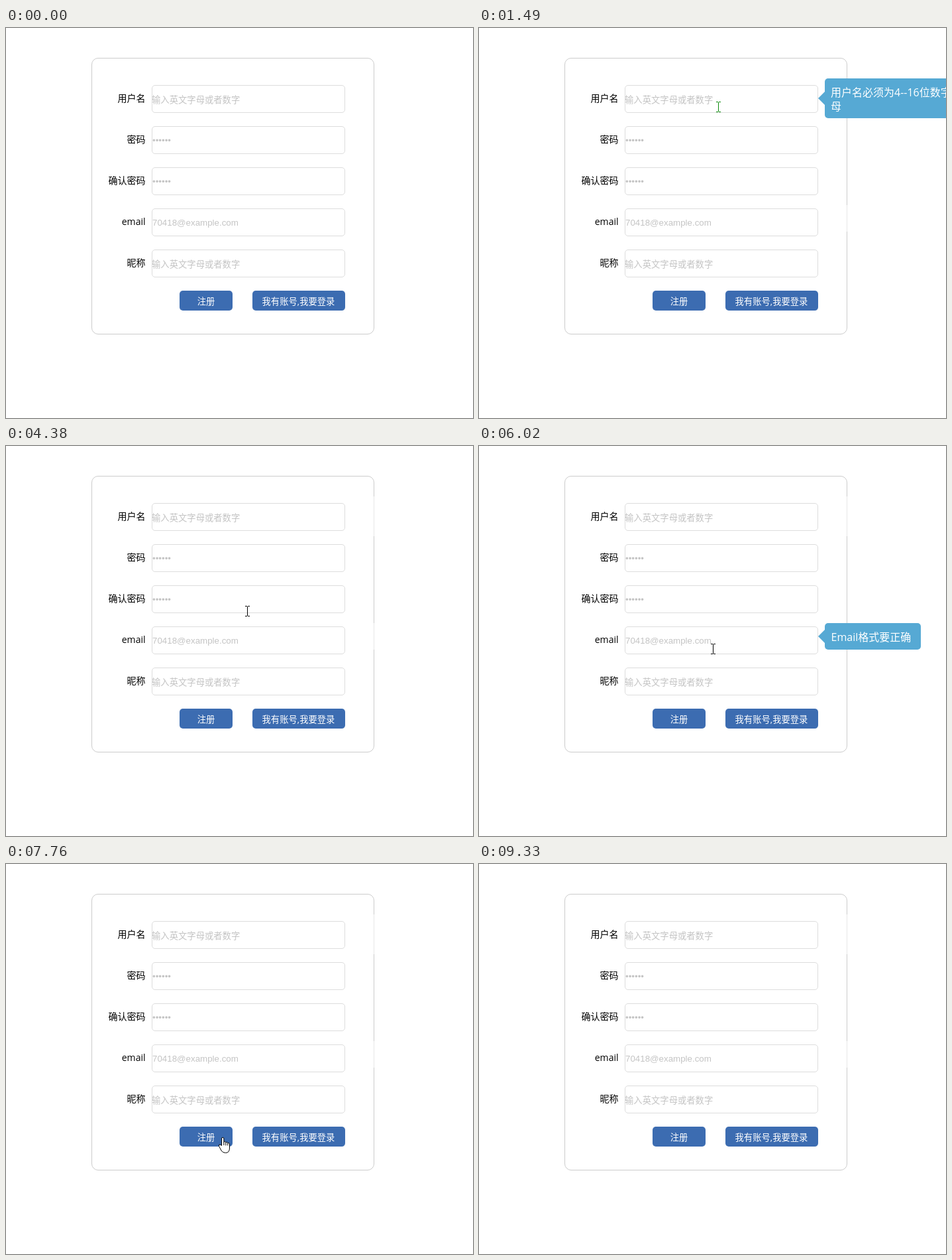
Recreate the animation shown at these times as an HTML page. Size 705 by 588 pixels, loop 9940 ms.

```html
<!DOCTYPE html>
<html lang="zh-CN">
<head>
<meta charset="utf-8">
<style>
html, body { margin: 0; width: 100%; height: 100%; overflow: hidden; background: #fff; }
svg { display: block; font-family: "Open Sans", "Noto Sans CJK SC", "Noto Sans CJK", sans-serif; }
.label { font-size: 14px; text-anchor: end; }
.hint { font-size: 13.333px; fill: #c4c4c4; }
.latin { font-family: "Liberation Sans", Arial, sans-serif; }
.button { fill: #3c6cb1; }
.button text { font-size: 13.333px; font-weight: 500; fill: #fff; text-anchor: middle; }
.tip { fill: #56a9d4; }
.tip text { font-size: 16px; font-weight: 500; fill: #fff; }
.gap { fill: #e8e8e8; }
.beam { fill: none; shape-rendering: crispEdges; }
.pointer { fill: #fff; stroke: #000; stroke-linejoin: round; }
</style>
</head>
<body>
<svg width="705" height="588" viewBox="0 0 705 588">
  <rect x="129.5" y="45.5" width="426" height="416" rx="9.5" fill="#fff" stroke="#ccc"/>
  <g id="form"></g>
  <g class="button">
    <rect x="262" y="396" width="80" height="30" rx="5"/>
    <rect x="372" y="396" width="140" height="30" rx="5"/>
    <text x="302" y="417">注册</text>
    <text x="441.5" y="417">我有账号,我要登录</text>
  </g>

  <!-- faded stretches of the card border where a tip has closed -->
  <rect id="nameGap" class="gap" x="555" y="76" width="1" height="60"/>
  <rect id="emailGap" class="gap" x="555" y="267" width="1" height="40"/>

  <g id="nameTip" class="tip">
    <path d="M512 106l10-10v20z"/>
    <rect x="522" y="76" width="220" height="60" rx="5"/>
    <text x="531" y="103">用户名必须为4--16位数字和字</text>
    <text x="531" y="124">母</text>
  </g>
  <g id="emailTip" class="tip">
    <path d="M512 287l10-10v20z"/>
    <rect x="522" y="267" width="145" height="40" rx="5"/>
    <text x="531.5" y="294">Email格式要正确</text>
  </g>

  <g id="cursor">
    <path id="beam" class="beam" d="M-3-7.5h3m1 0h3M.5-7v14M-3 7.5h3m1 0h3"/>
    <path id="hand" class="pointer" d="M-1.5 12.5V2a1.7 1.7 0 0 1 3.4 0V7.5a1.6 1.6 0 0 1 3 .3v.6a1.5 1.5 0 0 1 2.9.3v.8a1.4 1.4 0 0 1 2.7.4V16q0 7.5-6 7.5q-4.5 0-6.5-3.5L-5.4 13.6q-1-3 1.6-2.5zM1.9 7.5v4.5M4.9 8.4v4M7.8 9.5v3"/>
    <path id="arrow" class="pointer" d="M.5.5v16l3.7-3.5 2.5 5.5 2.2-1-2.5-5.3h5z"/>
  </g>
</svg>
<script>
const LOOP = 9940, START = 70, STEP = 78.4;
const $ = id => document.getElementById(id);
const show = (id, on) => $(id).style.display = on ? "" : "none";

const textHint = "输入英文字母或者数字";
const fields = [
  ["用户名", textHint],
  ["密码", "••••••"],
  ["确认密码", "••••••"],
  ["email", "70418@example.com"],
  ["昵称", textHint]
];
const fieldTop = i => 86 + 62 * i;

$("form").innerHTML = fields.map(([label, hint], i) => {
  const top = fieldTop(i), latin = hint !== textHint;
  return `
    <rect x="220.5" y="${top + .5}" width="291" height="41" rx="4.5" fill="#fff" stroke="#ddd"/>
    <text class="label" x="210.5" y="${top + 25}">${label}</text>
    <text class="hint ${latin ? "latin" : ""}" x="${latin ? 221 : 220}" y="${top + (latin ? 26 : 27)}">${hint}</text>`;
}).join("");

// The cursor glides to each point in turn and rests there until the next glide.
const entry = { x: 546, y: 540 };
const glides = [
  { from: 70, to: 860, x: 346, y: 386 },
  { from: 860, to: 1090, x: 382, y: 294 },
  { from: 1090, to: 1480, x: 361, y: 119 },
  { from: 1480, to: 1560, x: 366, y: 110 },
  { from: 2340, to: 2890, x: 360, y: 169 },
  { from: 2960, to: 3130, x: 360, y: 181 },
  { from: 3510, to: 4000, x: 367, y: 235 },
  { from: 4300, to: 4700, x: 353, y: 302 },
  { from: 6000, to: 6430, x: 350, y: 356 },
  { from: 6730, to: 7210, x: 289, y: 410 },
  { from: 7510, to: 8400, x: 429, y: 417 },
  { from: 8840, to: 9320, x: 715, y: 608 }
];

function cursorAt(t) {
  let { x, y } = entry;
  for (const g of glides) {
    const k = Math.min(1, Math.max(0, (t - g.from) / (g.to - g.from)));
    x += (g.x - x) * k;
    y += (g.y - y) * k;
  }
  return [Math.round(x), Math.round(y)];
}

const inside = (x, y, left, top, width, height) =>
  x >= left && x < left + width && y >= top && y < top + height;

function draw() {
  const t = performance.now() % LOOP;
  const sampled = START + Math.floor((t - START + 10) / STEP) * STEP;
  const [x, y] = cursorAt(sampled);
  const field = fields.findIndex((f, i) => inside(x, y, 220, fieldTop(i), 292, 42));
  const onButton = inside(x, y, 262, 396, 80, 30) || inside(x, y, 372, 396, 140, 30);

  show("cursor", t >= START);
  $("cursor").setAttribute("transform", `translate(${x} ${y})`);
  show("beam", field >= 0);
  show("hand", onButton);
  show("arrow", field < 0 && !onButton);
  $("beam").style.stroke = t < 2420 ? "#0a8a0a" : "#000";

  show("nameTip", field === 0);
  show("emailTip", field === 3);
  show("nameGap", t > 2420 && field !== 0);
  show("emailGap", t > 1170 && field !== 3);
  requestAnimationFrame(draw);
}
draw();
</script>
</body>
</html>
```
